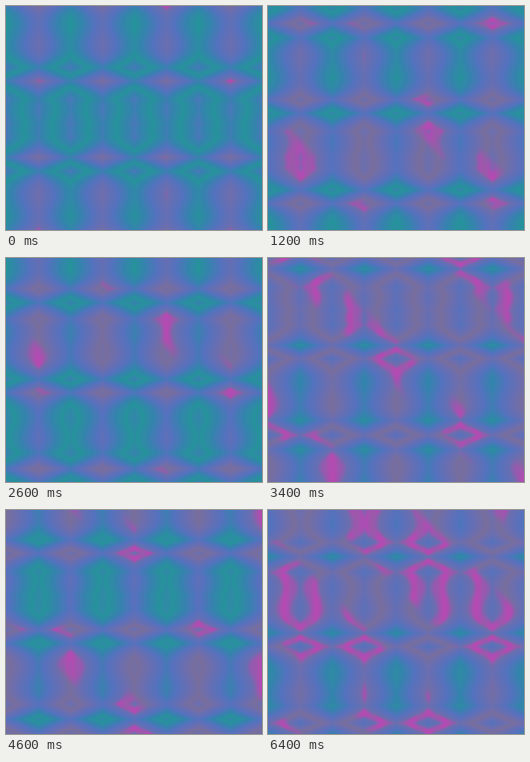
Recreate the animation shown at these times as an HTML page with a canvas. Size 256x224 px, loop 6500 ms.

```html
<!DOCTYPE html>
<html lang="en">
<head>
<meta charset="utf-8">
<title>Wavy lattice</title>
<style>
  html, body { margin: 0; width: 100%; height: 100%; overflow: hidden; background: #3a84b0; }
  canvas { display: block; width: 256px; height: 224px; image-rendering: pixelated; }
</style>
</head>
<body>
<canvas id="stage" width="256" height="224"></canvas>
<script>
const W = 256, H = 224, LOOP = 6500, STEP = 100;
const TAU = Math.PI * 2;
const WAVE = 256 / 3;   // length of the vertical ripple
const SWING = 19;       // its depth
const CELL = 64;
const SHADES = 32;
const PINK = [200, 62, 184];

const ctx = document.getElementById('stage').getContext('2d');
const image = ctx.createImageData(W, H);

const mod = (a, n) => ((a % n) + n) % n;
const clamp = a => Math.max(0, Math.min(1, a));
const smooth = (a, b, x) => { const k = clamp((x - a) / (b - a)); return k * k * (3 - 2 * k); };
const tri = a => 1 - Math.abs(mod(a, CELL) - CELL / 2) / (CELL / 4);

// Grey to violet, blue and teal, then back again.
const stops = [[120, 110, 158], [104, 110, 178], [84, 114, 190], [54, 130, 174], [38, 146, 156]];
const palette = Array.from({ length: SHADES }, (_, i) => {
  const p = (1 - Math.abs(1 - 2 * i / SHADES)) * (stops.length - 1);
  const k = Math.min(Math.floor(p), stops.length - 2);
  return stops[k].map((c, j) => c + (stops[k + 1][j] - c) * (p - k));
});

function draw(time) {
  const n = Math.floor((time % LOOP) / STEP);
  const centre = 28 - 4.4 * n;
  const cycle = 0.02 + 0.0742 * n;
  const drift = 2 * centre - 75;
  const spread = 0.9 * smooth(58, 64, n);
  const data = image.data;
  let at = 0;

  for (let y = 0; y < H; y++) {
    const v = y - SWING * Math.sin(TAU * (y - centre) / WAVE);
    const row = tri(v + 16);
    for (let x = 0; x < W; x++) {
      const height = (tri(x) + row) / 2;
      const q = mod(cycle + 0.35 * (1 - height), 1);
      const shade = Math.floor(q * SHADES);
      const band = smooth(0.12, 0.03, Math.min(q, 1 - q));
      const diagonal = Math.cos(TAU * (x - y - drift) / (2 * WAVE));
      const mask = smooth(0.45, 0.95, diagonal + spread);
      const bead = 0.8 + 0.2 * Math.cos(TAU * x / 16);
      const glow = 0.75 * band * mask * bead;
      const base = palette[shade];
      for (let j = 0; j < 3; j++) data[at++] = base[j] + (PINK[j] - base[j]) * glow;
      data[at++] = 255;
    }
  }
  ctx.putImageData(image, 0, 0);
}

const start = performance.now();
function tick() {
  draw(performance.now() - start);
  requestAnimationFrame(tick);
}
tick();
</script>
</body>
</html>
```
